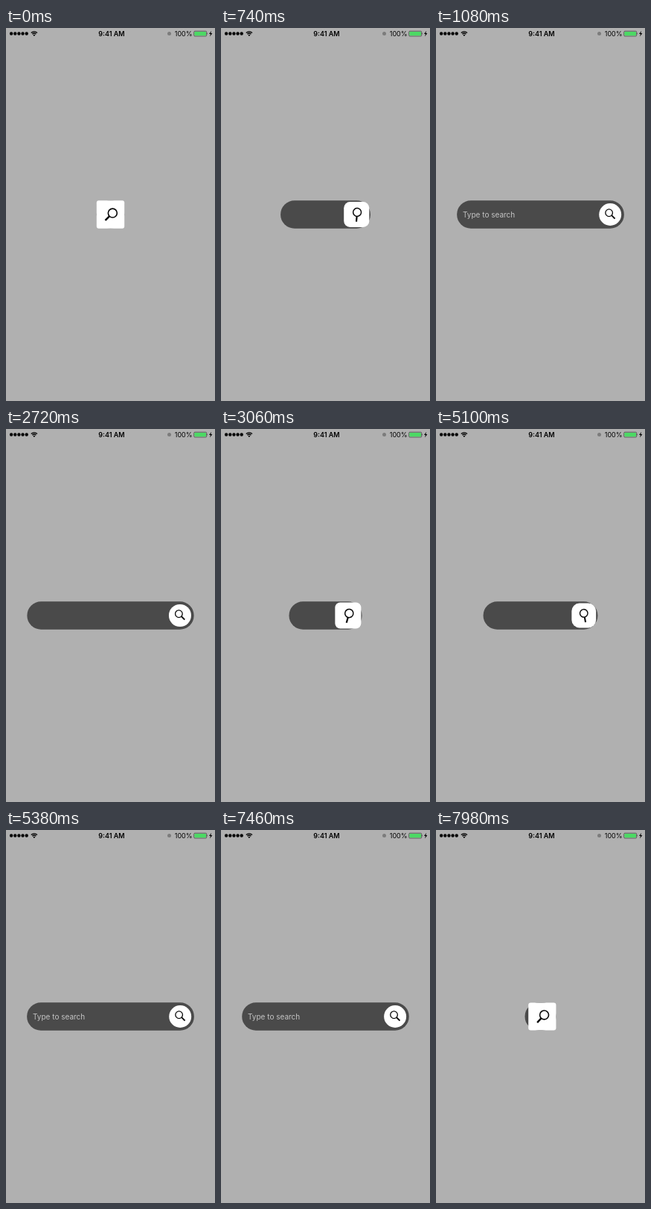
Write an HTML page that moves like this. It is 281 px wide and 500 px high and loops after 8000 ms.

```html
<!DOCTYPE html>
<html lang="en">
<head>
<meta charset="utf-8">
<title>Expanding search field</title>
<style>
  html, body { margin: 0; width: 100%; height: 100%; overflow: hidden; background: #b0b0b0; }
  svg { display: block; width: 100%; height: 100%; }
  text { font-family: Inter, Roboto, sans-serif; }
</style>
</head>
<body>
<svg viewBox="0 0 281 500">
  <rect width="281" height="500" fill="#b0b0b0"/>

  <!-- status bar -->
  <path d="M7.1 7.5h21" stroke="#000" stroke-width="4.4" stroke-linecap="round" stroke-dasharray="0 5.15"/>
  <g fill="none" stroke="#000" stroke-width="1.3">
    <path d="M33.8 6.5a5.8 5.8 0 0 1 8.2 0M35.4 8.2a3.6 3.6 0 0 1 5 0"/>
  </g>
  <path d="M36.4 9.4a2.2 2.2 0 0 1 3 0l-1.5 1.6z"/>
  <text x="142" y="10.8" font-size="9" font-weight="600" text-anchor="middle">9:41 AM</text>
  <circle cx="219.5" cy="7.5" r="2.5" fill="#7c7c7c"/>
  <text x="250.6" y="10.8" font-size="9" text-anchor="end">100%</text>
  <rect x="252.7" y="4.2" width="17" height="6.8" rx="1.3" fill="none" stroke="#222" stroke-width=".6"/>
  <rect x="253.4" y="4.9" width="15.6" height="5.4" rx=".7" fill="#4cd964"/>
  <path d="M270.4 6.3q1.2 1.2 0 2.5z" fill="#222"/>
  <path d="M276.2 3.8l-3.2 4.3h2l-1 3.4 3.4-4.5h-2.1z"/>

  <!-- search field -->
  <rect id="pill" y="231.3" height="37.4" rx="18.7" fill="#4a4a4a"/>
  <text id="hint" x="36" y="253.6" font-size="10" fill="#c4c4c4">Type to search</text>
  <rect id="button" fill="#fff"/>
  <g id="icon" fill="none" stroke="#0a0a0a">
    <circle cx=".5" cy="-2.7" r="4.8" stroke-width="1.3"/>
    <path d="M.5 2.2V8.5" stroke-width="1.9"/>
  </g>
</svg>
<script>
const LOOP = 8000, DURATION = 600, CENTER_X = 140.5, CENTER_Y = 250;
const MOVES = [
  { start: 460, from: 0, to: 1 },
  { start: 2698, from: 1, to: 0 },
  { start: 4758, from: 0, to: 1 },
  { start: 7448, from: 1, to: 0 }
];
const HINT_SPANS = [[1080, 2715], [5380, 7475]];

const [pill, hint, button, icon] =
  ['pill', 'hint', 'button', 'icon'].map(id => document.getElementById(id));

const mix = (a, b, p) => a + (b - a) * p;
const set = (node, attrs) => {
  for (const name in attrs) node.setAttribute(name, attrs[name]);
};

// cubic-bezier(.42, 0, .58, 1)
function easeInOut(x) {
  if (x <= 0 || x >= 1) return x <= 0 ? 0 : 1;
  let low = 0, high = 1, s;
  for (let i = 0; i < 24; i++) {
    s = (low + high) / 2;
    const bx = 1.26 * s * (1 - s) ** 2 + 1.74 * s * s * (1 - s) + s ** 3;
    if (bx < x) low = s; else high = s;
  }
  return s * s * (3 - 2 * s);
}

function openness(t) {
  const move = MOVES.filter(m => t >= m.start).pop();
  return move ? mix(move.from, move.to, easeInOut((t - move.start) / DURATION)) : 0;
}

function draw(t) {
  const p = openness(t);
  const width = mix(37.4, 224.8, p);
  const size = mix(37.4, 30, p);
  const x = CENTER_X + 93.7 * p;

  set(pill, { x: CENTER_X - width / 2, width });
  set(button, {
    x: x - size / 2, y: CENTER_Y - size / 2,
    width: size, height: size, rx: mix(3, 15, p)
  });
  set(icon, {
    transform: `translate(${x} ${CENTER_Y}) rotate(${mix(45, -45, p)}) scale(${size / 30})`
  });
  hint.style.visibility =
    HINT_SPANS.some(([a, b]) => t >= a && t < b) ? 'visible' : 'hidden';
}

const began = performance.now();
function frame() {
  draw((performance.now() - began) % LOOP);
  requestAnimationFrame(frame);
}
frame();
</script>
</body>
</html>
```
